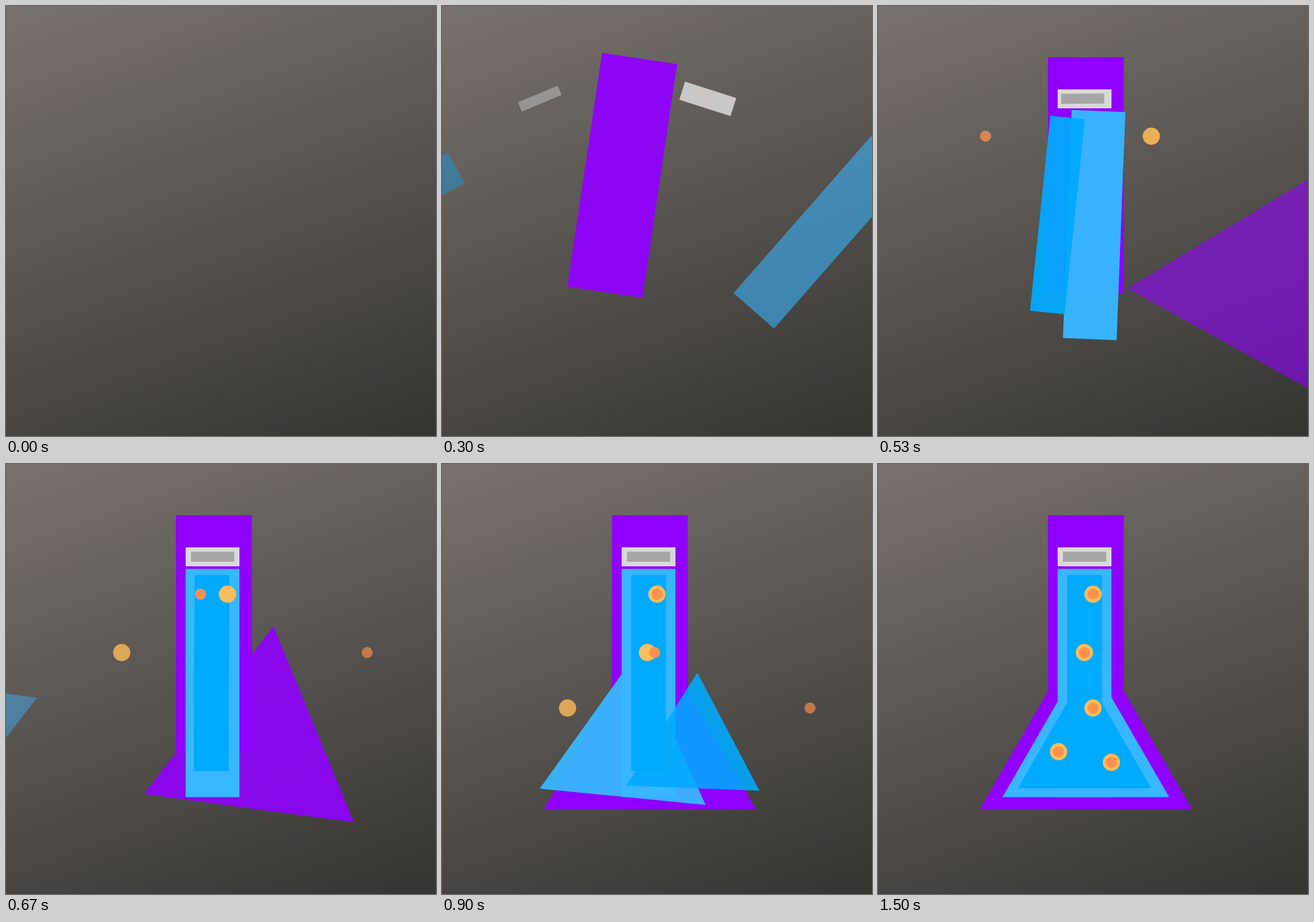
An HTML page that plays this animation: 748 by 748 pixels, repeating every 8000 ms.

```html
<!DOCTYPE html>
<html lang="en">
<head>
<meta charset="utf-8">
<title>Flask</title>
<style>
  html, body { margin: 0; width: 100%; height: 100%; overflow: hidden; }
  body { background: linear-gradient(160deg, #7a726e, #343431); }
  svg { display: block; width: 100vw; height: 100vh; }
</style>
</head>
<body>
<svg id="stage" viewBox="0 0 748 748"></svg>
<script>
const LOOP = 8000, FRAME = 100 / 3;
const DURATION = 500, STAGGER = 58, TRAVEL = 750;

const PURPLE = '#9000ff', SKY = '#38b6ff', BLUE = '#00aaff';
const AMBER = '#ffbd59', ORANGE = '#ff914d';

const rect = (w, h) => `M${-w / 2} ${-h / 2}h${w}v${h}h${-w}z`;
const tri = (w, h = w * Math.sqrt(3) / 2) => `M0 ${-h / 2}L${w / 2} ${h / 2}H${-w / 2}z`;
const disc = r => `M${-r} 0a${r} ${r} 0 0 1 ${2 * r} 0a${r} ${r} 0 0 1 ${-2 * r} 0z`;

// Painted back to front: order of entry, centre, outline, fill, starting turn
const parts = [
  [0, 361.5, 294.5, rect(132, 411), PURPLE, 132],
  [7, 361.7, 440.5, tri(368.5), PURPLE, 70],
  [1, 359.3, 161.5, rect(93.5, 33), '#d9d9d9', 129],
  [2, 359.4, 161.2, rect(75, 17.5), '#a6a6a6', -90],
  [3, 359.3, 381, rect(93.5, 397), SKY, 98.5],
  [10, 361.5, 454, tri(290), SKY, 120],
  [4, 359.3, 363.5, rect(60.5, 341), BLUE, 95],
  [11, 359.3, 463.5, tri(232), BLUE, 20.5]
];

// Bubbles: amber disc first, orange core right after
[[5, 374, 226.5], [8, 359, 328], [12, 374, 424.5], [14, 314, 500.5], [16, 406, 519]]
  .forEach(([order, x, y]) => parts.push(
    [order, x, y, disc(15), AMBER, 0],
    [order + 1, x, y, disc(9.7), ORANGE, 0]
  ));

const stage = document.getElementById('stage');
const nodes = parts.map(([, , , d, fill]) => {
  const node = document.createElementNS('http://www.w3.org/2000/svg', 'path');
  node.setAttribute('d', d);
  node.setAttribute('fill', fill);
  return stage.appendChild(node);
});

function draw(time) {
  parts.forEach(([order, x, y, , , turn], i) => {
    const t = Math.min(1, Math.max(0, (time - order * STAGGER) / DURATION));
    const rest = (1 - t) ** 3;
    const side = order % 2 ? 1 : -1;
    nodes[i].setAttribute('transform',
      `translate(${x + side * TRAVEL * rest} ${y}) rotate(${turn * rest})`);
    nodes[i].setAttribute('opacity', 1 - rest);
  });
}

const start = performance.now();
function tick() {
  const time = (performance.now() - start) % LOOP;
  // Motion advances at 30 frames per second
  draw(Math.floor((time + 5) / FRAME) * FRAME);
  requestAnimationFrame(tick);
}
tick();
</script>
</body>
</html>
```
